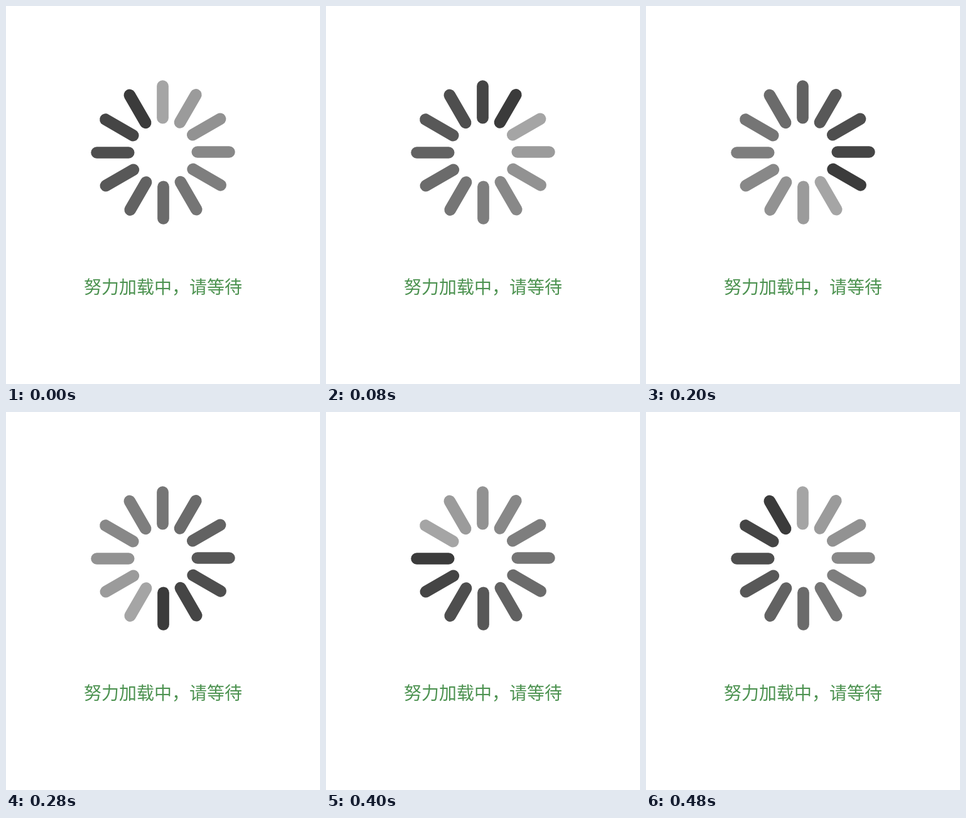
An HTML page for the animation above (0.52 s loop, 500 px wide and 602 px high).

```html
<!DOCTYPE html>
<html lang="zh-CN">
<head>
<meta charset="utf-8">
<style>
  html, body { margin: 0; width: 100%; height: 100%; overflow: hidden; background: #fff; }
  svg { display: block; }
  line { stroke-width: 18.7; stroke-linecap: round; }
  text { font: 300 28px "Noto Sans CJK SC", "Noto Sans CJK", sans-serif; fill: #4c9250; text-anchor: middle; }
</style>
</head>
<body>
<svg width="500" height="602" viewBox="0 0 500 602">
  <g id="spinner" transform="translate(250 233)"></g>
  <text x="250" y="457.5">努力加载中，请等待</text>
</svg>
<script>
  const COUNT = 12, STEP = 40, STEPS = 13; // the last step holds the first pose again
  const DARK = 59, LIGHT = 165;
  const spinner = document.getElementById('spinner');

  const bars = Array.from({ length: COUNT }, (_, i) => {
    const bar = document.createElementNS('http://www.w3.org/2000/svg', 'line');
    const attrs = { x1: -0.5, x2: -0.5, y1: -105.4, y2: -54.8, transform: `rotate(${i * 360 / COUNT})` };
    for (const name in attrs) bar.setAttribute(name, attrs[name]);
    return spinner.appendChild(bar);
  });

  function draw(now) {
    const step = Math.floor(now / STEP) % STEPS;
    bars.forEach((bar, i) => {
      const age = (i - step + 2 * COUNT) % COUNT;
      const grey = Math.round(LIGHT + (DARK - LIGHT) * age / (COUNT - 1));
      bar.setAttribute('stroke', `rgb(${grey},${grey},${grey})`);
    });
  }

  function tick() {
    draw(performance.now());
    requestAnimationFrame(tick);
  }
  tick();
</script>
</body>
</html>
```
